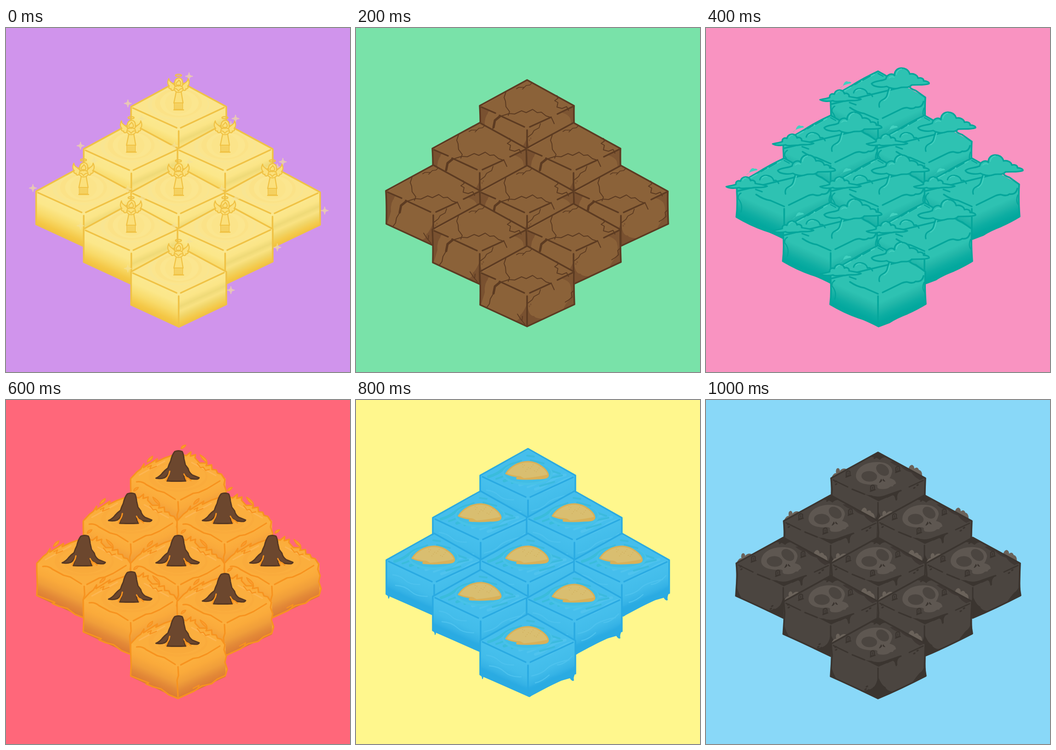
Write an HTML page that moves like this. It is 748 px wide and 748 px high and loops after 1200 ms.

```html
<!DOCTYPE html>
<html lang="en">
<head>
<meta charset="utf-8">
<title>Isometric tiles</title>
<style>
html, body { margin: 0; width: 100%; height: 100%; overflow: hidden; }
svg { display: block; width: 100vw; height: 100vh; }
</style>
</head>
<body>
<svg id="stage" viewBox="0 0 748 748" fill="none" stroke-linecap="round" stroke-linejoin="round"></svg>
<script>
const STEP = 200;
const XS = [0, -103, 101, -204, 0, 204, -103, 101, 0];

const fill = (d, c, o = 1) => `<path d="${d}" fill="${c}" opacity="${o}"/>`;
const line = (d, c, w = 3.5) => `<path d="${d}" stroke="${c}" stroke-width="${w}"/>`;
const shape = (d, c, s, w = 3) => `<path d="${d}" fill="${c}" stroke="${s}" stroke-width="${w}"/>`;
const oval = (x, y, rx, ry, c, turn = 0) =>
  `<ellipse cx="${x}" cy="${y}" rx="${rx}" ry="${ry}" fill="${c}" transform="rotate(${turn} ${x} ${y})"/>`;

// Gradient running from a front edge of the top face down to the ground edge.
function shade(id, x, y, side, stops) {
  const tags = stops.map(([at, c]) => `<stop offset="${at}" stop-color="${c}"/>`).join('');
  return `<linearGradient id="${id}" gradientUnits="userSpaceOnUse" x1="${x + side * 52}" y1="${y - 25}"
    x2="${x + side * 79}" y2="${y + 35}">${tags}</linearGradient>`;
}

// Box whose nearest top corner is (x, y).
function block(id, x, y, top, left, right = left) {
  const l = x - 103, r = x + 103;
  return shade(id + 'l', x, y, -1, left) + shade(id + 'r', x, y, 1, right) +
    fill(`M${l},${y - 48}L${x},${y - 105}L${r},${y - 48}L${x},${y}Z`, top) +
    fill(`M${l},${y - 49}L${x + .5},${y - 1}V${y + 72}L${l},${y + 24}Z`, `url(#${id}l)`) +
    fill(`M${r},${y - 49}L${x},${y - 1}V${y + 72}L${r},${y + 24}Z`, `url(#${id}r)`);
}

function gold() {
  const edge = '#f0c245', skin = '#fbe07c';
  const star = (x, y) => `<g opacity=".65">` +
    fill(`M${x},${y - 9}Q${x + 1},${y - 1} ${x + 9},${y}Q${x + 1},${y + 1} ${x},${y + 9}Q${x - 1},${y + 1} ${x - 9},${y}Q${x - 1},${y - 1} ${x},${y - 9}Z`, '#f4e29a') +
    line(`M${x - 7},${y}h14M${x},${y - 7}v14`, '#f4e29a', 2.4) + '</g>';
  const wing = 'M367,484C361,477 355,477 354,469C350,477 352,483 355,485C352,489 356,492 359,491C358,496 364,496 368,491Z';
  const angel = shape(wing, skin, edge, 2.3) +
    `<g transform="matrix(-1 0 0 1 750 0)">${shape(wing, skin, edge, 2.3)}</g>` +
    shape('M369,484Q365,489 366,494L370,498L365,522H385L381,498L385,494Q385,488 381,484Z', skin, edge, 2.3) +
    shape('M367,480C365,465 385,463 384,478Q385,485 381,486Q375,480 370,486Q367,485 367,480Z', skin, edge, 2.3) +
    line('M371,483C368,476 374,477 376,472Q382,478 379,483Q375,488 371,483M368,491Q371,490 375,496Q379,490 383,491M370,498Q375,500 380,498', edge, 2.2) +
    shape('M366,522H384V536H366Z', skin, edge, 2) +
    line('M369,524V535M372,524V535M375,524V535M378,524V535M381,524V535', edge, 1.5) +
    line('M365,537H386', edge, 2.6) +
    `<ellipse cx="375" cy="462" rx="6.5" ry="2.3" stroke="${edge}" stroke-width="2.4"/>`;
  return block('g', 375.5, 578, '#fbe58d',
    [[0, '#fbe890'], [.3, '#fbe78a'], [.62, '#f8da69'], [.9, '#f4c745'], [1, '#f3c241']],
    [[0, '#fbe890'], [.25, '#fbe587'], [.42, '#efda78'], [.56, '#f9e282'], [.72, '#f1d669'], [.9, '#f4c94a'], [1, '#f3c241']]) +
    oval(375, 525, 67, 34, '#f8e592') + oval(378, 525, 61, 32, '#fbe58d') +
    oval(375, 522, 51, 31, '#fbe287') + oval(377, 522, 42, 28, '#fbe68f') +
    oval(375, 522, 29, 24, '#fbe48a') +
    line('M272,530L375,474L479,530V601L376,650L272,602Z', edge) +
    line('M276,533L371,576M380,576L474,532M375.5,583V648', edge) +
    star(398, 464) + star(265, 523) + star(489, 570) + angel;
}

function earth() {
  const edge = '#5c3b22', dark = '#795130', base = '#8b6239';
  return block('e', 372.5, 578, base, [[0, base]]) +
    fill('M271,531L290,540Q278,556 280,575L272,601Z', dark) +
    fill('M372,600Q362,622 357,624Q357,635 346,637L372,649L408,632Q390,632 387,626Q376,628 372,600Z', dark) +
    fill('M474,531L448,545Q462,549 466,558Q471,575 465,590Q456,598 451,611L475,601Z', dark, .75) +
    line('M276,528L367,477', '#a17448', 2.5) +
    line('M372,474L474,530Q473,548 475,601L372,649L270,602Q271,560 269,530Z', edge) +
    line('M273,533L303,546M312,551L366,576M378,576L424,555M438,548L471,532M372,583V648', edge) +
    line('M313,553L302,562L299,577', edge, 5) +
    line('M299,577L292,589L290,600L284,608', edge, 2) +
    line('M326,500L322,512L325,520L326,532L334,543L331,551M314,553L333,547L345,548L360,541L370,545L384,538L394,545L403,544L413,552L425,556L431,569', edge, 2) +
    line('M437,508L439,514L432,519L439,523L437,533L448,536L458,532L462,540', edge, 2) +
    line('M349,493L354,490L366,490L370,486L378,485L382,481M362,494L366,490', edge, 1.7) +
    line('M401,569L398,578L387,584L383,591L374,598M474,570L468,576L470,585L463,591L455,596M351,622L358,633L367,644M361,636L362,627', edge, 1.8) +
    [[377, 605], [380, 601], [281, 545], [285, 547], [282, 551]].map(([x, y]) => oval(x, y, 1.4, 2, dark)).join('');
}

function air() {
  const base = '#2ec2b2', edge = '#05a69b', glow = '#44d0bf';
  const puff = 'M360,500C367,493 382,495 391,490C393,480 404,476 410,482C408,463 438,460 443,479C452,477 460,482 461,488C469,486 474,490 473,494C480,494 486,497 485,500C476,504 462,502 447,503C441,511 428,506 421,509C411,513 399,510 393,506C382,509 363,507 360,500Z';
  const wisp = 'M248,535C257,533 264,532 269,530C268,523 274,521 279,523C281,511 299,511 301,522C307,519 312,524 311,528C320,530 330,530 337,534C327,539 312,535 303,538C291,537 281,541 276,537C267,539 254,539 248,535Z';
  return block('a', 374, 578, base, [[0, base], [.3, base], [.5, '#23b7a9'], [.73, '#0dada2'], [.9, '#03a89e'], [1, '#03a79d']]) +
    fill('M291,509Q299,506 299,501Q304,492 309,496Q315,495 316,499Q302,501 291,509Z', '#42d0bf') +
    line('M271,543V531L291,519L317,504Q340,489 374,473L392,483M441,504Q443,511 456,515L477,530Q475,560 478,600Q460,611 438,621Q414,630 399,640L375,649Q350,635 332,630Q302,620 270,601Q273,575 271,545Z', edge) +
    line('M290,522L315,508M331,499L366,480', glow, 2.5) +
    line('M324,502L336,495M341,493L357,484M374,478L385,484', edge, 2.5) +
    line('M313,552Q329,563 344,565L374,578M384,575L425,555Q435,551 440,553Q450,556 456,551Q470,553 473,539M374,583V642', edge) +
    line('M280,549Q273,553 274,561Q285,574 280,590M474,553Q469,566 475,574', edge, 2.6) +
    line('M398,510C393,520 397,529 384,535Q374,540 377,551', edge, 3) +
    line('M401,511C397,520 399,531 387,537', glow, 2) +
    line('M321,520C323,507 348,507 351,522Q358,519 362,528', edge, 3) +
    line('M326,516Q331,511 337,513', glow, 2) +
    line('M312,541L326,546', edge, 3) +
    shape(puff, base, edge, 3.3) + line('M398,488Q402,483 409,486M414,480Q416,469 425,468', glow, 2) +
    shape(wisp, base, edge, 3.3) + line('M284,521Q286,516 291,516', glow, 2);
}

function fire() {
  const base = '#fbad3b', edge = '#f7931f', rock = '#6c472e', rim = '#573822';
  const flames = 'M271,545V530L285,515L293,509L300,498L299,506L315,496L329,487L326,494L345,485L374,475L392,480L402,472L401,481L412,478L411,485L421,496L437,496L435,502L447,500L448,510L457,511L460,518L468,520L476,532L474,543L479,557L476,570L481,585L477,599L459,607L447,617L425,622L409,633L374,649L354,641L337,628L321,624L306,618L310,615L271,600L272,576Z';
  const spark = d => shape(d, '#fb9c2f', edge, 2);
  return spark('M307,494Q308,486 319,481Q319,490 307,494Z') + spark('M422,478Q425,488 437,495Q438,487 422,478Z') +
    spark('M381,463Q383,457 391,457Q389,463 381,465Z') +
    fill(flames, base) +
    block('f', 374.5, 578, '#fbae3d', [[0, '#fcb03f'], [.28, '#faaa3b'], [.55, '#f09e3a'], [.78, '#e38937'], [1, '#dc7b33']]) +
    oval(374, 526, 64, 32, '#faab3c') + oval(377, 524, 57, 29, '#fbae3e') +
    oval(374, 531, 44, 20, '#f9aa3b') +
    line('M290,522L345,492M404,495L456,523', '#fdb653', 3) +
    line(flames, edge, 3.2) +
    line('M284,537Q296,535 305,543L329,556L344,560L368,575M380,576L407,562L419,560L437,552L465,535M374,580L375,599L372,609L374,645', edge, 3.2) +
    line('M308,505L316,501L313,509L327,503M416,497L423,506L429,505L434,512L442,510M304,617L319,624M407,627L420,620L417,627L428,621', edge, 2.4) +
    shape('M367,471Q375,468 383,471Q386,476 387,487L390,500L396,508Q398,517 405,522L420,528Q418,532 410,531L400,530Q391,526 387,520Q387,529 391,535Q370,536 350,535L356,515Q352,523 345,528Q337,531 326,529Q335,525 340,518Q345,512 352,507Q354,500 358,492Q361,478 367,471Z', rock, rim, 2.8) +
    line('M356,514Q355,521 351,527L348,534M387,520Q390,527 396,529L402,534M390,527L393,534', edge, 3);
}

function water() {
  const base = '#45beec', edge = '#2aaae2', sand = '#d9be70', shore = '#d9b057';
  const streaks = [0, 1, 2, 3, 4, 5, 6, 7].map(i => {
    const x = 288 + i * 17, y = 526 + i * 4.5;
    return line(`M${x},${y}q18,-5 31,-16t34,-15`, i < 4 ? '#3abcdc' : '#4fc3ee', i % 2 ? 4 : 6);
  }).join('');
  return fill('M270,592V599Q274,600 274,606Q276,609 277,602L374,643Q375,649 382,643L427,619Q440,611 451,609L465,605Q470,613 474,610Q472,603 477,594L374,620Z', edge) +
    block('w', 374, 572, base, [[0, '#47c0ed'], [.45, '#42bcea'], [.7, '#36b3e6'], [.85, edge], [1, edge]]) +
    streaks +
    line('M337,500l22,-9M322,510l24,-9M372,480l15,2M380,490l28,7M414,509l29,10M400,546l31,-9M420,529l28,-6', '#3cbade', 4) +
    oval(373, 519, 55, 25, '#48c2e8') + oval(373, 517, 51, 22, '#41bde6') +
    line('M284,555Q301,557 311,567T343,576M290,578Q310,579 323,591T359,602M382,600Q405,595 415,584T463,565M390,615Q405,612 420,598M438,576Q453,575 470,557', '#4dc2ee', 2.3) +
    fill('M270,580Q289,592 300,594Q315,607 332,610Q349,622 374,625Q398,616 410,612Q426,598 440,601Q460,592 477,577V595L375,645L270,597Z', edge, .45) +
    line('M374,643L270,597V523L374,465L477,523V595', edge) +
    line('M275,526L369,570M379,570L472,527M374,577V640', edge) +
    shape('M326,519C336,503 355,493 375,493C396,494 416,510 418,522C418,528 411,530 395,530Q370,532 350,530Q349,527 356,526Q339,525 326,519Z', sand, shore, 3) +
    fill('M326,519Q340,524 358,525L365,529Q390,527 418,521Q418,530 405,530Q372,533 350,530L355,526Q336,526 326,519Z', shore) +
    [...Array(14).keys()].map(i => oval(362 + i * 13 % 42, 499 + i * 7 % 17, .8, .8, '#cba853')).join('');
}

function death() {
  const base = '#4b4540', edge = '#3b3530', bone = '#5e5751';
  const grave = (x, y) => shape(`M${x - 4},${y + 6}V${y - 3}Q${x},${y - 8} ${x + 4},${y - 4}V${y + 4}Z`, base, edge, 2.5) +
    line(`M${x - 5},${y + 8}L${x + 6},${y + 4}M${x},${y - 2}V${y + 2}`, edge, 2);
  return fill('M273,528Q278,518 283,519Q281,509 287,508Q291,509 291,514Q297,507 305,510L287,527Z', '#6a625a') +
    fill('M440,512Q441,502 448,501Q453,503 453,509Q460,504 463,512Q470,513 470,525Z', '#6a625a') +
    block('d', 374.5, 578, base, [[0, base]]) +
    fill('M374,473L392,484Q383,484 378,490Q370,483 356,484Z', edge) +
    fill('M411,493L477,529L465,534Q452,527 447,518Q432,514 423,504Q412,505 400,494Z', edge, .75) +
    fill('M374,601Q382,621 390,624Q393,633 407,634L374,650L337,633Q358,631 363,625Q371,620 374,601Z', edge) +
    fill('M477,573Q473,589 464,594Q457,602 447,616L478,601ZM272,575Q275,594 285,608L271,601Z', edge) +
    line('M374,474L272,530L274,555L271,601Q318,622 374,649Q422,629 478,600L475,580L477,530Z', edge) +
    line('M277,534L308,549M318,554L345,565M394,571L424,557M442,549L472,535M374,583V648', edge, 3) +
    fill('M330,557Q345,567 359,567Q374,574 395,565L424,555L418,563Q415,567 416,576Q413,583 411,573Q410,567 405,567L375,580Z', edge) +
    fill('M326,525C327,506 348,495 371,495C391,494 405,503 405,515Q403,525 399,530Q413,533 413,542Q408,543 406,548Q401,547 397,551Q389,555 376,553Q371,550 373,546Q369,542 359,544C342,544 326,538 326,525Z', bone) +
    oval(355, 526, 17, 11.5, base, 4) + oval(384, 512, 15.5, 11, base, 38) +
    fill('M381,531L376,540Q380,540 383,535ZM385,531L390,537Q386,538 384,534Z', edge) +
    grave(309, 520) + grave(362, 551) + grave(417, 510) +
    [[371, 481], [367, 486], [283, 543], [282, 537], [350, 623], [347, 629], [353, 631], [453, 551], [460, 545]]
      .map(([x, y]) => oval(x, y, 3, 1.8, edge, -30)).join('');
}

const scenes = [
  { bg: '#d094ec', art: gold, ys: [-359, -267, -267, -175, -173, -173, -93, -93, 0], wide: [-206.5, 204] },
  { bg: '#79e2a9', art: earth, ys: [-361, -268, -268, -176, -175, -175, -92, -92, 0] },
  { bg: '#f993c1', art: air, ys: [-379, -283, -283, -190, -190, -190, -94, -93, 0] },
  { bg: '#ff677a', art: fire, ys: [-359, -267, -267, -175, -175, -175, -96, -92, 0] },
  { bg: '#fff78d', art: water, ys: [-359, -267, -267, -175, -175, -175, -96, -92, 0] },
  { bg: '#89d8f8', art: death, ys: [-360, -267, -267, -175, -175, -175, -92, -92, 0], wide: [-206, 206] }
];

const stage = document.getElementById('stage');
stage.innerHTML = scenes.map(({ bg, art, ys, wide = [-204, 204] }, i) => {
  const tiles = ys.map((y, k) => {
    const x = k === 3 ? wide[0] : k === 5 ? wide[1] : XS[k];
    return `<use href="#tile${i}" x="${x}" y="${y}"/>`;
  }).join('');
  return `<defs><g id="tile${i}">${art()}</g></defs>
    <g class="scene" visibility="hidden"><rect width="748" height="748" fill="${bg}"/>${tiles}</g>`;
}).join('');

const layers = [...stage.querySelectorAll('.scene')];
const start = performance.now();

function draw(t) {
  const now = Math.floor(Math.max(0, t) / STEP) % layers.length;
  layers.forEach((g, i) => g.setAttribute('visibility', i === now ? 'visible' : 'hidden'));
}

function tick() {
  draw(performance.now() - start);
  requestAnimationFrame(tick);
}
tick();
</script>
</body>
</html>
```
